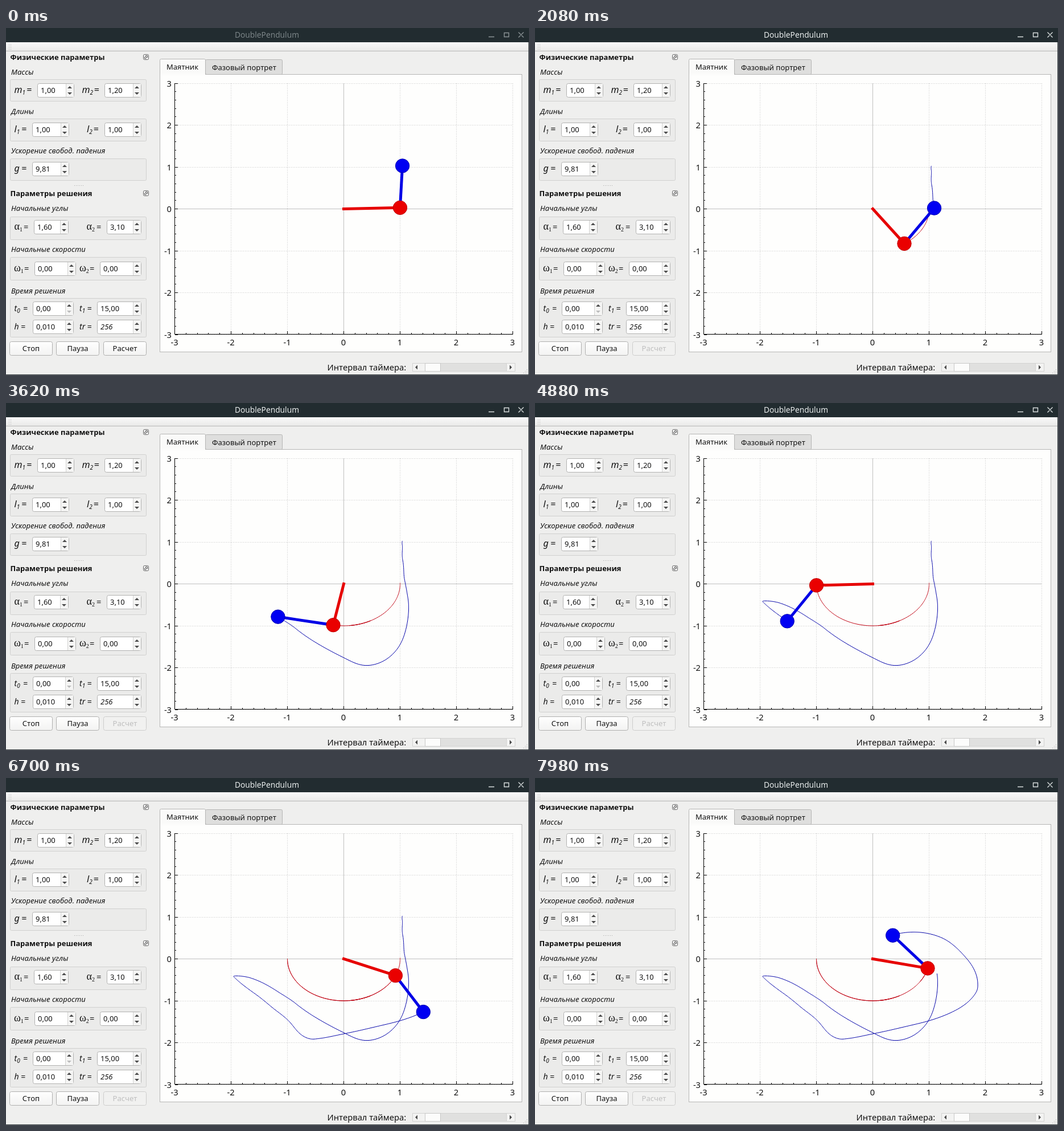
Write an HTML page that moves like this. It is 919 px wide and 609 px high and loops after 8 s.

```html
<!DOCTYPE html>
<html lang="ru">
<head>
<meta charset="utf-8">
<title>DoublePendulum</title>
<style>
html, body { margin: 0; width: 100%; height: 100%; overflow: hidden; background: #efefee; }
svg { display: block; width: 100vw; height: 100vh; }
text { font: 13px "Noto Sans", sans-serif; fill: #111; white-space: pre; }
.b { font-weight: 700; }
.i { font-style: italic; }
.big { font-size: 14.67px; }
.var { font-size: 16px; font-style: italic; }
.small { font-size: 14px; font-style: italic; }
.greek { font: 18px "Liberation Serif", serif; }
.mid { text-anchor: middle; }
.end { text-anchor: end; }
.title { font-size: 13.75px; font-weight: 500; text-anchor: middle; }
</style>
</head>
<body>
<svg id="stage" viewBox="0 0 919 609" xmlns="http://www.w3.org/2000/svg">
  <defs>
    <linearGradient id="bar" x2="0" y2="1"><stop stop-color="#fafafa"/><stop offset="1" stop-color="#e9e9e8"/></linearGradient>
    <linearGradient id="btn" x2="0" y2="1"><stop stop-color="#fefefe"/><stop offset="1" stop-color="#f3f3f2"/></linearGradient>
  </defs>
</svg>
<script>
const LOOP = 8000, PRESS = 840, START = 980;
const stage = document.getElementById('stage');

function el(tag, attrs, text) {
  const node = document.createElementNS('http://www.w3.org/2000/svg', tag);
  for (const k in attrs) node.setAttribute(k, attrs[k]);
  if (text !== undefined) node.textContent = text;
  return stage.appendChild(node);
}
const label = (x, y, s, cls = '') => el('text', { x, y, class: cls }, s);
const fill = (x, y, width, height, color) => el('rect', { x, y, width, height, fill: color });
const box = (x, y, w, h, color, stroke, rx = 0) =>
  el('rect', { x: x + .5, y: y + .5, width: w - 1, height: h - 1, rx, fill: color, stroke });
const path = (d, stroke, more) => el('path', { d, stroke, fill: 'none', ...more });

function arrow(x, y, dx, dy, color = '#4a4a4a') {
  const d = dx ? `M${x - 2 * dx} ${y - 4}v8l${4 * dx} -4z` : `M${x - 4} ${y - 2 * dy}h8l-4 ${4 * dy}z`;
  el('path', { d, fill: color });
}

// Window frame and toolbar
fill(0, 0, 919, 25, '#222c30');
const title = label(458.5, 17, 'DoublePendulum', 'title');
const controls = path('M848 15.5h10M875.5 8.5h8v7h-8zM900.5 7.5l9 9M909.5 7.5l-9 9', '', { 'stroke-width': 1.4 });
fill(0, 25, 919, 15, 'url(#bar)');
fill(0, 40, 919, 1, '#b9b9b8');
for (let y = 28; y < 39; y += 3) {
  fill(5, y, 1, 1, '#aaa');
  fill(8, y, 1, 1, '#aaa');
}

// Left panel
for (const [y, s] of [[56, 'Физические параметры'], [295, 'Параметры решения']]) {
  label(7.5, y, s, 'b');
  box(241, y - 10, 10, 10, '#f4f4f4', '#666', 2);
  path(`M245.5 ${y - 7.5}h3v3h-3zM243.5 ${y - 5.5}v3h3`, '#555');
}
for (let x = 120; x < 136; x += 3) fill(x, 276, 1, 1, '#aaa');

const groups = [
  [82, 'Массы', 90, 39], [151, 'Длины', 159, 40], [220, 'Ускорение свобод. падения', 229, 39],
  [321, 'Начальные углы', 331, 41], [393, 'Начальные скорости', 402, 41], [466, 'Время решения', 474, 69]
];
for (const [y, s, top, h] of groups) {
  label(9, y, s, 'i');
  box(7, top, 240, h, '#ebebea', '#d0d0cf', 2);
}

function spin(x, y, w, value, cls, downColor) {
  box(x, y, w, 25, '#fff', '#b2b2b1', 3);
  fill(x + w - 15, y + 1, 14, 23, '#f5f5f4');
  fill(x + w - 15, y + 1, 1, 23, '#d2d2d1');
  arrow(x + w - 8, y + 7, 0, -1);
  arrow(x + w - 8, y + 18, 0, 1, downColor);
  label(x + 6, y + 17, value, cls);
}
function symbol(x, y, s, sub, eq, cls) {
  const t = label(x, y, s, cls);
  if (sub) {
    const low = document.createElementNS(t.namespaceURI, 'tspan');
    low.setAttribute('dy', 3);
    low.style.fontSize = '10px';
    low.textContent = sub;
    t.appendChild(low);
  }
  label(eq, y, '=', cls === 'greek' ? 'big' : cls);
}
symbol(14.5, 114, 'm', '1', 36, 'var');
symbol(133.5, 114, 'm', '2', 154.5, 'var');
symbol(14.5, 183, 'l', '1', 27, 'var');
symbol(142, 183, 'l', '2', 153.5, 'var');
symbol(14.5, 252, 'g', '', 27, 'var');
symbol(14.5, 354, 'α', '1', 31, 'greek');
symbol(141.5, 354, 'α', '2', 159, 'greek');
symbol(14, 427, 'ω', '1', 32, 'greek');
symbol(129, 427, 'ω', '2', 147, 'greek');
symbol(14.5, 497, 't', '0', 30, 'small');
symbol(129, 497, 't', '1', 142.5, 'small');
symbol(14.5, 529, 'h', '', 26, 'small');
symbol(129, 529, 'tr', '', 142.5, 'small');

spin(55, 97, 65, '1,00');
spin(173, 97, 65, '1,20');
spin(46, 166, 65, '1,00');
spin(173, 166, 65, '1,00');
spin(46, 235, 65, '9,81');
spin(49, 337, 61, '1,60');
spin(177, 337, 61, '3,10');
spin(50, 410, 73, '0,00');
spin(165, 410, 73, '0,00');
spin(47, 480, 72, '0,00', '', '#bbb');
spin(160, 480, 78, '15,00');
spin(47, 512, 72, '0,010');
spin(160, 512, 78, '256', 'i');

function button(x, s) {
  const face = box(x, 550, 76, 25, 'url(#btn)', '#b0b0af', 3);
  return { face, text: label(x + 38, 567, s, 'mid') };
}
button(6, 'Стоп');
button(88, 'Пауза');
const run = button(171, 'Расчет');

// Tabs and footer
box(270, 81, 637, 488, '#fefefd', '#b6b6b5');
box(350, 55, 136, 27, '#dededd', '#b6b6b5', 2);
path('M270.5 82V56.5q0 -2 2 -2h76q2 0 2 2V81.5', '#b6b6b5', { fill: '#fafaf9' });
fill(271, 80, 79, 3, '#fcfcfb');
label(282, 73, 'Маятник');
label(362, 74, 'Фазовый портрет');

label(564.5, 601, 'Интервал таймера:', 'big');
box(714, 588, 181, 15, '#e0e0df', '#d2d2d1');
box(714, 588, 23, 15, '#f3f3f2', '#d2d2d1');
box(736, 588, 28, 15, '#fcfcfb', '#c8c8c7');
box(879, 588, 16, 15, '#f3f3f2', '#d2d2d1');
arrow(721, 595.5, -1, 0);
arrow(887, 595.5, 1, 0);
for (let i = 0; i < 3; i++)
  for (let j = 0; j <= i; j++) fill(915 - 3 * j, 599 + 3 * i, 1, 1, '#b0b0b0');
fill(918, 25, 1, 584, '#333a3d');
fill(0, 608, 919, 1, '#333a3d');

// Plot
const X = v => 593.5 + 99 * v, Y = v => 317.5 - 73.5 * v;
for (let v = -3; v <= 3; v++) {
  const style = v ? { 'stroke-dasharray': '1 2' } : {};
  const color = v ? '#c4c4c4' : '#c0c0c0';
  const gx = Math.floor(X(v)) + .5, gy = Math.floor(Y(v)) + .5;
  path(`M${gx} 97V537`, color, style);
  path(`M297 ${gy}H890`, color, style);
  label(291, gy + 5, v, 'big end');
  label(gx - .5, 557, v, 'big mid');
}
let axes = 'M296.5 97V537.5H891';
for (let i = -15; i <= 15; i++) {
  const len = i % 5 ? 2 : 5;
  axes += `M${Math.floor(X(i / 5)) + .5} 537v${-len}M297 ${Math.floor(Y(i / 5)) + .5}h${len}`;
}
path(axes, '#000');

const trail1 = path('', '#c00010');
const trail2 = path('', '#0000a8');
const rod = color => path('', color, { 'stroke-width': 5, 'stroke-linecap': 'square' });
const ball = (color, stroke) => el('circle', { r: 12.2, fill: color, stroke });
const rod2 = rod('#0000e6'), rod1 = rod('#e60000');
const ball1 = ball('#ea0000', '#c00000'), ball2 = ball('#0000f2', '#0000b0');

// Swing: tick, angle of the upper rod, angle of the lower rod
const swing = [
  [2, 1.6, 3.1], [9, 1.496, 3.1], [17, 1.118, 2.992], [23, .665, 2.661], [28, .341, 2.205],
  [35, .1, 1.374], [38, .127, .925], [42, .26, .26], [46, .493, -.493], [53, .148, -1.49],
  [57, -.188, -1.77], [64, -.761, -1.843], [71, -1.36, -1.36], [78, -1.561, -.933],
  [84, -1.537, -.545], [89, -1.374, -.302], [96, -1.007, -.099], [103.5, -.31, -.31],
  [107, 0, -.45], [112, .463, -.463], [118, .957, -.095], [123, 1.163, .517],
  [125, 1.173, .803], [127.5, 1.15, 1.15], [130, 1.048, 1.492], [134, .99, 2.152],
  [139, 1.114, 2.806], [145, 1.237, 3.397], [151, 1.345, 3.809]
];
const REST = swing[0][0], LAST = swing.length - 1, TRAIL = 123, SUB = 4;

const rise = (i, c) => (swing[i + 1][c] - swing[i][c]) / (swing[i + 1][0] - swing[i][0]);
function slope(i, c) {
  if (i === 0) return 0;
  if (i === LAST) return rise(i - 1, c);
  const before = swing[i][0] - swing[i - 1][0], after = swing[i + 1][0] - swing[i][0];
  return (after * rise(i - 1, c) + before * rise(i, c)) / (before + after);
}
function angle(n, c) {
  const i = Math.max(1, swing.findIndex(k => k[0] >= n)) - 1;
  const w = swing[i + 1][0] - swing[i][0], u = (n - swing[i][0]) / w, v = 1 - u;
  return v * v * (1 + 2 * u) * swing[i][c] + u * u * (1 + 2 * v) * swing[i + 1][c]
    + u * v * w * (v * slope(i, c) - u * slope(i + 1, c));
}
const poses = [];
for (let n = REST; n <= swing[LAST][0]; n += 1 / SUB) {
  const a = angle(n, 1), b = angle(n, 2);
  const x = Math.sin(a), y = -Math.cos(a);
  poses.push([X(x), Y(y), X(x + Math.sin(b)), Y(y - Math.cos(b))]);
}

// Three ticks every 140 ms: held for 20, 20 and 100 ms
function tickAt(t) {
  if (t < START) return 0;
  const u = t - 960, r = u % 140;
  return 3 * Math.floor(u / 140) + (r < 20 ? 0 : r < 40 ? 1 : 2);
}

function draw(t) {
  const active = t >= PRESS, busy = t >= START;
  title.style.fill = active ? '#e8ecec' : '#7b8487';
  controls.setAttribute('stroke', active ? '#d8dddd' : '#8b9396');
  run.face.setAttribute('fill', busy ? '#f1f1f0' : active ? '#dadad9' : 'url(#btn)');
  run.face.setAttribute('stroke', busy ? '#cdcdcc' : '#b0b0af');
  run.text.style.fill = busy ? '#bfbfbf' : '#111';

  const k = Math.max(0, tickAt(t) - REST) * SUB, [x1, y1, x2, y2] = poses[k];
  const past = poses.slice(Math.max(0, k - TRAIL * SUB), k + 1);
  const line = i => k ? 'M' + past.map(p => p[i].toFixed(2) + ' ' + p[i + 1].toFixed(2)).join('L') : '';
  trail1.setAttribute('d', line(0));
  trail2.setAttribute('d', line(2));
  rod1.setAttribute('d', `M${X(0)} ${Y(0)}L${x1} ${y1}`);
  rod2.setAttribute('d', `M${x1} ${y1}L${x2} ${y2}`);
  [[ball1, x1, y1], [ball2, x2, y2]].forEach(([b, x, y]) => {
    b.setAttribute('cx', x);
    b.setAttribute('cy', y);
  });
}
const t0 = performance.now();
function frame() {
  draw((performance.now() - t0) % LOOP);
  requestAnimationFrame(frame);
}
draw(0);
requestAnimationFrame(frame);
</script>
</body>
</html>
```
